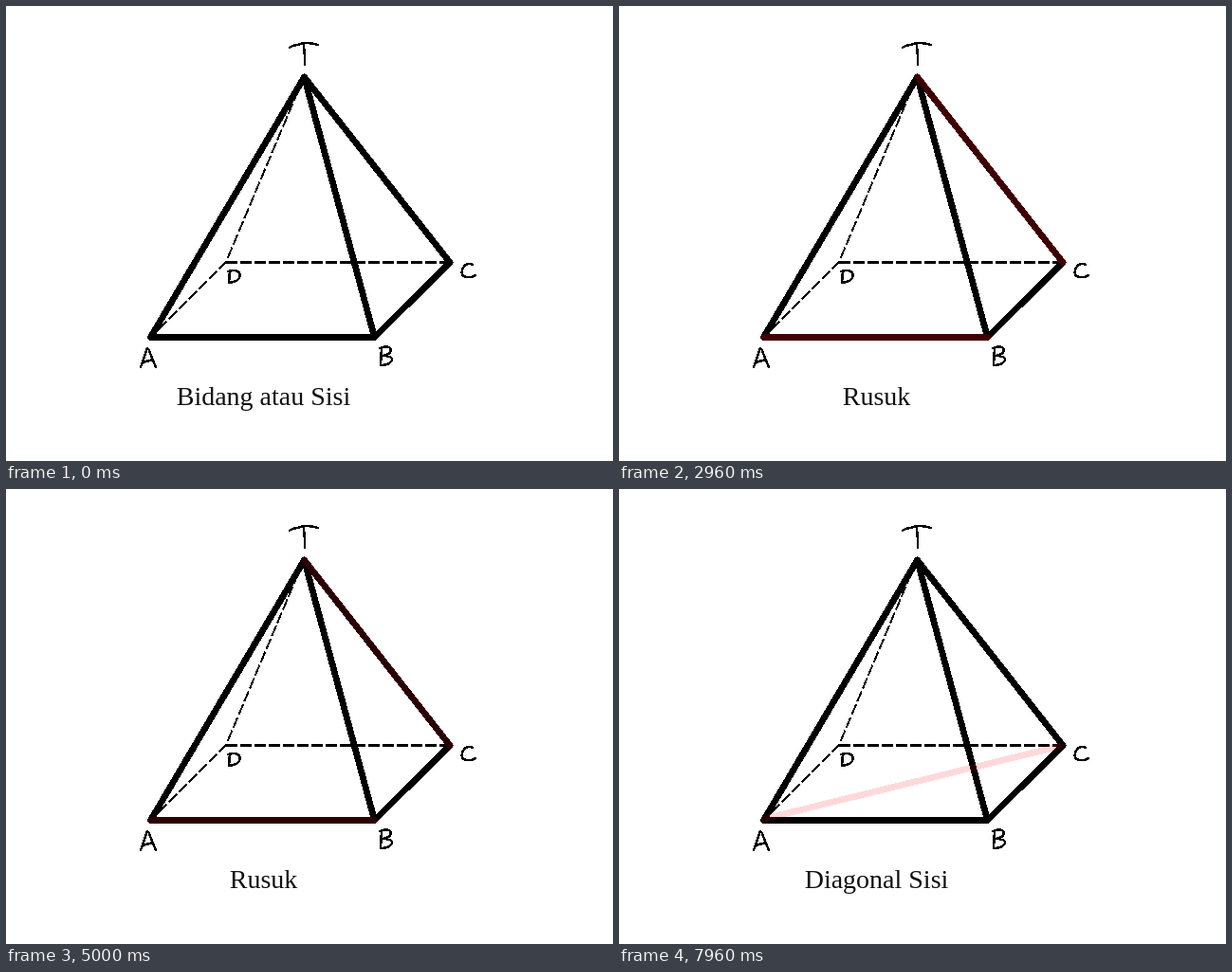
These frames come from a looping animation (640x480 px, 8000 ms). An HTML page:

```html
<!DOCTYPE html>
<html lang="id">
<head>
<meta charset="utf-8">
<title>Limas</title>
<style>
  html, body { margin: 0; width: 100%; height: 100%; overflow: hidden; background: #fff; }
  svg { display: block; width: 100vw; height: 100vh; fill: none; stroke-linecap: round; stroke-linejoin: round; }
  text { font: 28px "Liberation Serif", "Times New Roman", serif; fill: #111; text-anchor: middle; }
  path { shape-rendering: crispEdges; }
  .edge { stroke: #000; stroke-width: 6.8; }
  .hidden { stroke: #000; stroke-width: 2; stroke-linecap: butt; stroke-dasharray: 12 3; }
  .letter { stroke: #000; stroke-width: 2.5; }
  .face, #dots { fill: #f00; }
  .line { stroke: #f00; stroke-width: 6.8; }
</style>
</head>
<body>
<svg viewBox="0 0 640 480">
  <path class="hidden" d="M314 75L232 270L153 349"/>
  <path class="hidden" d="M232 270.5H468" style="stroke-width:3"/>
  <path class="edge" d="M314.500 75L152.500 349.500H388.500L468 270.500L314.500 75L388.500 349.500"/>
  <g class="letter">
    <path d="M299 44Q301 42 307 41Q316 37 329 41M314 41Q315 51 315 62"/>
    <path d="M142 381L149 361Q151 362 153 369L158 381M144 376L155 373"/>
    <path d="M396 361L395 379M394 361Q405 357 406 363Q405 368 397 369Q408 369 407 374Q404 379 395 379"/>
    <path d="M492 273Q486 270 482 276Q478 285 486 286Q491 287 495 284"/>
    <path d="M236 279L235 292M234 280Q246 277 247 284Q246 291 235 292"/>
  </g>
  <path id="base" class="face" d="M153 348L232 270H461L388 348Z"/>
  <path id="side" class="face" d="M316 77L469 270L388 350Z"/>
  <path id="edges" class="line" d="M152.500 349.500H388.500M314.500 74.500L468 270.500"/>
  <path id="diagonal" class="line" d="M153 348L466 271"/>
  <g id="dots">
    <circle cx="315" cy="76" r="8"/>
    <circle cx="152" cy="349" r="8"/>
    <circle cx="388" cy="349" r="8"/>
    <circle cx="464" cy="271" r="8"/>
    <circle cx="232" cy="270" r="8"/>
  </g>
  <text id="label" x="271.500" y="421"></text>
</svg>
<script>
const LOOP = 8000, STEP = 40, PEAK = 0.6;
const el = id => document.getElementById(id);
const ramp = (t, a, b) => Math.min(1, Math.max(0, (t - a) / (b - a)));
// fades in from a to b, out from c to d
const fade = (t, a, b, c, d) => PEAK * (ramp(t, a, b) - ramp(t, c, d));
// slow rise and fall, linear in light
const glow = (t, a, b) => {
  const mid = (a + b) / 2;
  return Math.pow(0.3 * (ramp(t, a, mid) - ramp(t, mid, b)), 1 / 2.2);
};

const layers = {
  base: t => fade(t, 0, 440, 920, 1360),
  side: t => fade(t, 1400, 1880, 2320, 2760),
  edges: t => glow(t, 2780, 5080),
  dots: t => fade(t, 5120, 5560, 5720, 6080) + fade(t, 6320, 6760, 7000, 7400),
  diagonal: t => 0.15 * ramp(t, 7440, 7960)
};
const labels = [[7440, "Diagonal Sisi"], [5120, "Titik Sudut"], [2760, "Rusuk"], [0, "Bidang atau Sisi"]];

function draw(now) {
  const t = Math.floor((now % LOOP) / STEP) * STEP;
  for (const id in layers) el(id).style.opacity = layers[id](t);
  el("label").textContent = labels.find(([start]) => t >= start)[1];
}

let begin;
function tick(now) {
  begin ??= now;
  draw(now - begin);
  requestAnimationFrame(tick);
}
draw(0);
requestAnimationFrame(tick);
</script>
</body>
</html>
```
